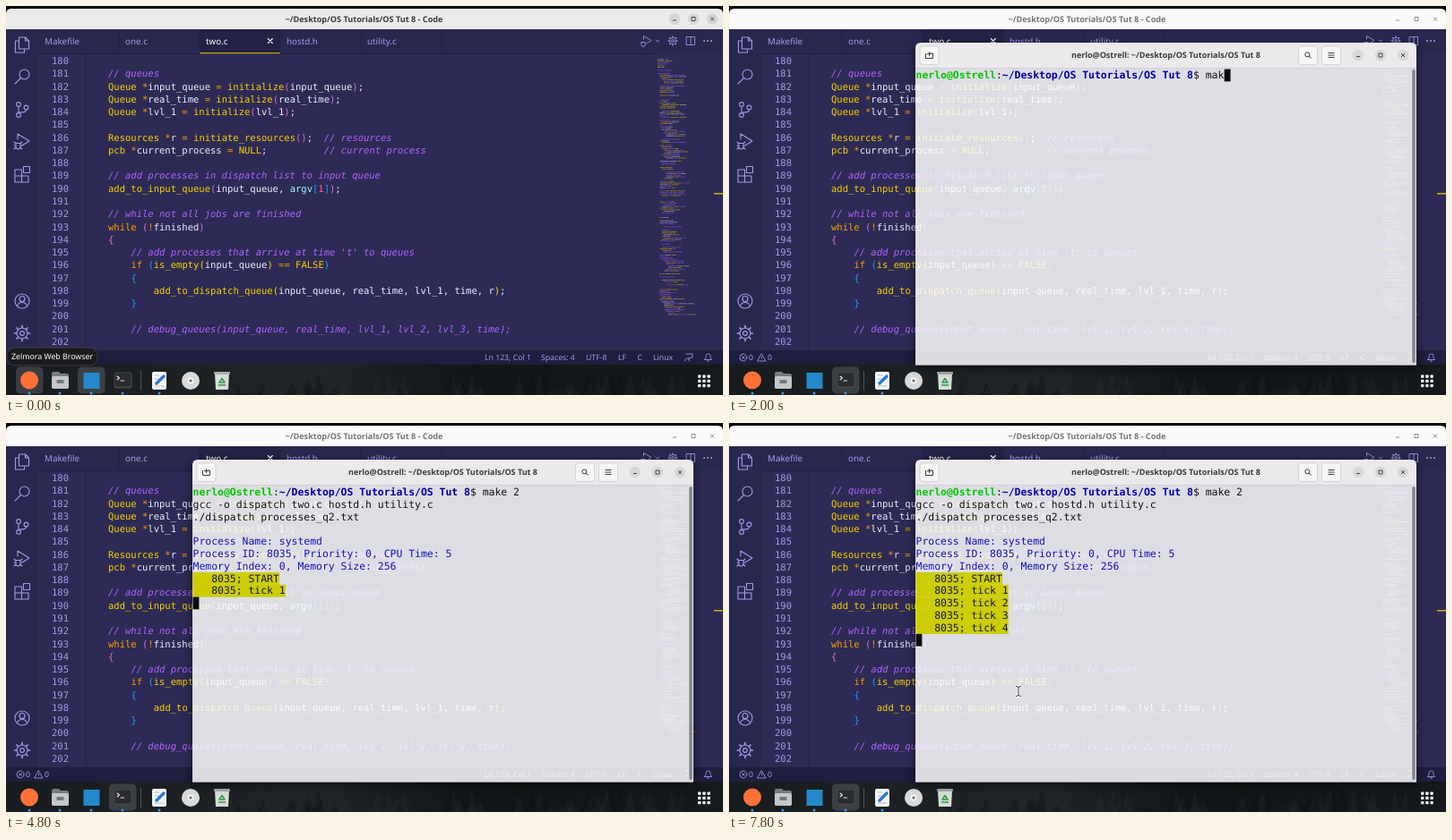
These frames come from a looping animation (800x435 px, 8000 ms). An HTML page:

```html
<!DOCTYPE html>
<html lang="en">
<head>
<meta charset="utf-8">
<title>Editor and terminal</title>
<style>
html, body { margin: 0; width: 100%; height: 100%; overflow: hidden; background: #111417; }
svg { display: block; width: 100%; height: 100%; }
text { white-space: pre; font-family: "Noto Sans", sans-serif; text-rendering: geometricPrecision; }
.code { font: 10.53px "DejaVu Sans Mono", monospace; }
.term { font: 11.43px "DejaVu Sans Mono", monospace; }
.line { fill: none; stroke: #a599e9; stroke-width: 1.1; stroke-linejoin: round; stroke-linecap: round; }
.thin .line { stroke-width: .85; }
</style>
</head>
<body>
<svg id="stage" viewBox="0 0 800 435">
  <defs>
    <linearGradient id="wall">
      <stop offset="0" stop-color="#181c1f"/><stop offset=".45" stop-color="#1f2427"/>
      <stop offset=".65" stop-color="#121517"/><stop offset="1" stop-color="#16191b"/>
    </linearGradient>
    <filter id="shadow" x="-10%" y="-10%" width="120%" height="125%"><feGaussianBlur stdDeviation="5"/></filter>
    <clipPath id="around"><path clip-rule="evenodd" d="M0 0H800V435H0ZM208 47q0-6 6-6H761q6 0 6 6V402H208Z"/></clipPath>
  </defs>
  <g id="editor"></g>
  <g id="dock"></g>
  <g id="tooltip"></g>
  <g id="terminal"></g>
  <g id="pointer"></g>
</svg>
<script>
const $ = id => document.getElementById(id);
const PURPLE = '#a599e9';

const rect = (x, y, w, h, fill, r = 0, extra = '') =>
  `<rect x="${x}" y="${y}" width="${w}" height="${h}" rx="${r}" fill="${fill}" ${extra}/>`;
const circle = (x, y, r, fill, extra = '') => `<circle cx="${x}" cy="${y}" r="${r}" fill="${fill}" ${extra}/>`;
const label = (x, y, size, fill, str, extra = '') =>
  `<text x="${x}" y="${y}" font-size="${size}" fill="${fill}" ${extra}>${str}</text>`;
const line = (d, extra = '') => `<path class="line" d="${d}" ${extra}/>`;
const ring = (x, y, r) => circle(x, y, r, 'none', 'class="line"');
const thin = content => `<g class="thin">${content}</g>`;
const span = (fill, str, extra = '') => `<tspan fill="${fill}" ${extra}>${str}</tspan>`;
const seeded = seed => () => (seed = (seed * 16807) % 2147483647) / 2147483647;

const FIRST_LINE = 180, LINE_HEIGHT = 14.27;
const source = `
// queues
Queue *input_queue = initialize(input_queue);
Queue *real_time = initialize(real_time);
Queue *lvl_1 = initialize(lvl_1);

Resources *r = initiate_resources();  // resources
pcb *current_process = NULL;          // current process

// add processes in dispatch list to input queue
add_to_input_queue(input_queue, argv[1]);

// while not all jobs are finished
while (!finished)
{
    // add processes that arrive at time 't' to queues
    if (is_empty(input_queue) == FALSE)
    {
        add_to_dispatch_queue(input_queue, real_time, lvl_1, time, r);
    }

    // debug_queues(input_queue, real_time, lvl_1, lvl_2, lvl_3, time);
`.split('\n');

const bracketColors = ['#ffd700', '#da70d6', '#179fff'];
let depth = 1;

function highlight(text) {
  const token = /(\/\/.*)|\b(while|if)\b|(\w+(?=\()|Queue|Resources|pcb|NULL|FALSE)|(argv)|([a-z_]\w*)|(\d+)|([(\[{])|([)\]}])|([*=!]+)|[^]/g;
  return text.replace(token, (s, comment, keyword, name, param, word, number, open, close, operator) => {
    if (comment) return span('#b362ff', s, 'font-style="italic"');
    if (keyword) return span('#ff9d00', s);
    if (name) return span('#fad000', s);
    if (param) return span('#9effff', s);
    if (number) return span('#ff628c', s);
    if (open) return span(bracketColors[depth++ % 3], s);
    if (close) return span(bracketColors[--depth % 3], s);
    if (operator) return span('#ff9d00', s);
    return span('#f0eeff', s);
  });
}

// Functions of random length: a comment, then a body whose indent wanders
function minimap() {
  const random = seeded(77);
  const colors = ['#fad000', '#e1dcff', '#fad000', '#b362ff'];
  let out = '', indent = 0, rowsLeft = 0;
  for (let y = 54; y < 346; y += 1.75) {
    const header = y < 76;
    if (rowsLeft-- <= 0) {
      rowsLeft = 7 + random() * 14;
      indent = 0;
      continue;
    }
    indent = header ? 0 : Math.max(1, Math.min(5, indent + Math.floor(random() * 3) - 1));
    if (random() < 0.2) continue;
    let x = 727 + indent * 2.4;
    const words = header ? 1 + random() : 1 + random() * 2.6;
    const comment = random() < 0.3;
    for (let i = 0; i < words; i++) {
      const w = 2 + random() * 8;
      const fill = comment ? '#b362ff' : colors[Math.floor(random() * 4)];
      out += rect(x.toFixed(1), y.toFixed(1), w.toFixed(1), 1, fill);
      x += w + 0.8;
    }
  }
  return `<g opacity=".42">${out}</g>`;
}

// Minimise, maximise and close glyphs
const windowButtons = (xs, y, color, disc) =>
  (disc ? xs.map(x => circle(x, y, 6.2, disc)).join('') : '') +
  `<path fill="none" stroke="${color}" d="M${xs[0] - 2} ${y + 1.5}h4M${xs[1] - 2} ${y - 2}h4v4h-4zM${xs[2] - 2} ${y - 2}l4 4m0-4l-4 4"/>`;

const gear = (x, y, r) => {
  let teeth = '';
  for (let i = 0; i < 8; i++) {
    const c = Math.cos(i * Math.PI / 4), s = Math.sin(i * Math.PI / 4);
    teeth += `M${x + c * r * .75} ${y + s * r * .75}L${x + c * r} ${y + s * r}`;
  }
  return ring(x, y, r * .7) + ring(x, y, r * .28) + line(teeth, `style="stroke-width:${r * .2}"`);
};

function activityBar() {
  return line('M14.5 35h7l4 4v9h-11zM21.5 35v4h4M14.5 39h-4v13h10v-4') +
    line('M16 81l-6 6') + ring(20.5, 76.5, 5.5) +
    ring(14, 110, 2.4) + ring(14, 122, 2.4) + ring(22.5, 113.5, 2.4) +
    line('M14 112.5v7M22.5 116c0 3-3 3-8.5 3') +
    line('M13 149v-6l13 8-8 5M11 153.5h5v4a2.5 2.5 0 0 1-5 0zM9 152l2 2m7-2l-2 2M9 156h2m5 0h2M9 160l2-2m7 2l-2-2') +
    line('M10 183h7.5v14h-7.5zM10 190h15v7h-7.5M19.5 179.5h7v7h-7z') +
    ring(18, 330, 8) + ring(18, 327.5, 3) + line('M12.5 336c1-6 10-6 11 0') + gear(18, 366, 8.5);
}

function editor(focused) {
  let out = rect(0, 0, 800, 401, '#060608') +
    `<path d="M0 26V9q0-6 6-6H794q6 0 6 6V26z" fill="${focused ? '#ebebeb' : '#fafafa'}"/>` +
    label(399.5, 18, 9.1, focused ? '#3b3b3b' : '#77757b', '~/Desktop/OS Tutorials/OS Tut 8 - Code',
      'text-anchor="middle" font-weight="700"') +
    windowButtons([746, 767, 788], 14.5, focused ? '#444' : '#8a888c', focused && '#d6d6d6') +
    rect(0, 26, 800, 359, '#2d2b55') + rect(0, 26, 36, 359, '#28284e') + rect(36, 26, 764, 27, '#28284e') +
    rect(36, 53, 690, 1, '#1e1e3f') + rect(88.6, 54, .7, 331, '#1e1e3f') +
    rect(216, 26, 90, 27, '#222244') + rect(216, 52.2, 90, 1, '#fad000');
  ['Makefile', 'one.c', 'two.c', 'hostd.h', 'utility.c'].forEach((name, i) => {
    out += label(43 + i * 90, 43, 9.8, i === 2 ? '#fff' : PURPLE, name) +
      rect(125.7 + i * 90, 26, .6, 27, '#222244');
  });
  out += line('M292.3 36.5l5 5m0-5l-5 5', 'style="stroke:#fff"') +
    thin(line('M711.5 37v-3.5l8.5 5-5.5 3.5M709 40.5h4v3a2 2 0 0 1-4 0zM725 38l2 2 2-2M759.5 34.5h9v9h-9zM764 34.5v9') +
      gear(744, 39, 5.2)) +
    [779, 783, 787].map(x => circle(x, 39, 1, PURPLE)).join('') + activityBar();

  depth = 1;
  source.forEach((text, i) => {
    const y = (65 + i * LINE_HEIGHT).toFixed(2);
    out += `<text class="code" x="70" y="${y}" fill="${PURPLE}" text-anchor="end">${FIRST_LINE + i}</text>` +
      `<text class="code" x="114" y="${y}">${highlight(text)}</text>`;
  });
  out += minimap() + rect(790, 209, 10, 1.6, '#c9a815') + rect(0, 385, 800, 16.5, '#1e1e3f');

  const status = [[22, '0'], [43, '0'], [534, 'Ln 123, Col 1'], [597, 'Spaces: 4'], [647, 'UTF-8'],
    [683, 'LF'], [704.5, 'C'], [722, 'Linux']];
  out += status.map(([x, s]) => label(x, 396.2, 8.7, PURPLE, s)).join('');
  return out + thin(ring(16, 393, 4) +
    line('M14.5 391.5l3 3m0-3l-3 3M36.5 389l4.5 8h-9zM36.5 392v2') +
    line('M759 389h7v4h-2l-2 2v-2M757.500 397c0-4 5-4 5 0M779.5 395.5h8l-1.5-2v-2a2.5 2.5 0 0 0-5 0v2zM782.5 397h2'));
}

function dock(active, hovered) {
  const random = seeded(19);
  let out = rect(0, 401, 800, 34, 'url(#wall)');
  for (let i = 0; i < 60; i++) {
    const x = 240 + random() * 520, h = 6 + random() * 22;
    out += `<path d="M${x} ${435 - h}l${3 + random() * 5} ${h}h-12z" fill="${random() < .5 ? '#0c0f11' : '#2a3033'}" opacity=".28"/>`;
  }
  const tile = x => x ? rect(x - 15, 403.5, 30.5, 30, '#fff', 5, 'fill-opacity=".15"') : '';
  out += tile(active) + tile(hovered) +
    circle(26, 418.5, 10, '#ff7139') +
    `<path d="M51 411q0-2 2-2h6l2 2h7q2 0 2 2v13q0 2-2 2h-15q-2 0-2-2z" fill="#777b80"/>` +
    rect(51, 414, 19, 14, '#c4c6c9', 2) + rect(56.5, 418, 8, 4, '#74787d', 1) +
    rect(86.5, 410, 18, 18, '#2489ca') +
    rect(120.5, 409.5, 20, 18, '#45474a', 2.5) + rect(121.5, 410.5, 18, 15, '#2a2c30', 2) +
    line('M124 414l2.5 2-2.5 2M128 419h3.5', 'style="stroke:#e8e8e8"') +
    rect(150, 408, .8, 22, '#606468') +
    rect(163, 409, 16, 20, '#f5f6f7', 2) +
    line('M166 413h5M166 417h4M166 425h10', 'style="stroke:#b7bcc3"') +
    line('M168 422l8-8', 'style="stroke:#2878d8;stroke-width:3.5"') +
    circle(206, 419, 10, '#d9d9d9') + circle(206, 419, 3.5, '#f5f5f5') + circle(206, 419, 1.6, '#63666a') +
    `<path d="M233 411h16l-1 18h-14z" fill="#d8ddd9"/>` + rect(232, 409, 18, 3, '#a8afaa', 1) +
    line('M238 421l3-4.5 3 4.5zM237.5 424h7', 'style="stroke:#2f9a4c;stroke-width:1.6"') +
    [26, 60, 95, 130, 171].map(x => circle(x, 433, 1.5, '#3b9be8')).join('');
  for (let i = 0; i < 9; i++) out += rect(772 + i % 3 * 5.2, 412.5 + Math.floor(i / 3) * 5.2, 3.4, 3.4, '#f2f2f2', .8);
  return out;
}

const tooltip = (x, w, str) => rect(x, 382, w, 20, '#1b1b1d', 9, 'stroke="#48484c" stroke-width=".7"') +
  label(x + w / 2, 395, 8.8, '#fff', str, 'text-anchor="middle"');

const HOST = 'nerlo@Ostrell', FOLDER = '~/Desktop/OS Tutorials/OS Tut 8';
const LEFT = 208.5, TOP = 70.6, ROW = 13.77, CELL = 6.883, BLUE = '#1212b8';

const terminalFrame =
  rect(206, 44, 563, 362, '#000', 8, 'opacity=".45" filter="url(#shadow)" clip-path="url(#around)"') +
  rect(208, 69, 559, 333, '#fff', 0, 'fill-opacity=".84"') +
  '<path d="M208 69.5V47q0-6 6-6H761q6 0 6 6V69.5z" fill="#ebe9eb"/>' +
  rect(208, 69, 559, .7, '#cfcbd1') +
  [[213, 21], [635.5, 21], [661.5, 21]].map(([x, w]) =>
    rect(x, 45, w, 20.5, '#f7f6f7', 3, 'stroke="#cfccd0" stroke-width=".8"')).join('') +
  '<g fill="none" stroke="#3d3d3d"><path d="M219.5 53v5.5h8v-5.5h-2.5M223.5 51v5M221 53.5h5M668.5 52.5h7M668.5 55h7M668.5 57.5h7M647 56l2.5 2.5"/><circle cx="645.3" cy="54.3" r="2.5"/></g>' +
  label(487.5, 58.4, 9, '#3b3b3b', `${HOST}: ${FOLDER}`, 'text-anchor="middle" font-weight="700"') +
  windowButtons([702, 727, 752], 55, '#444', '#dad7da') +
  rect(762.3, 71, 3.4, 328, '#858289', 1.5) + rect(208, 401.3, 559, .7, '#8a8695');

const termText = (row, content) =>
  `<text class="term" x="${LEFT}" y="${(TOP + row * ROW + 10.7).toFixed(2)}" fill="#111">${content}</text>`;

const during = (t, spans) => spans.some(([from, to]) => t >= from && t < to);
const keyTimes = [1600, 1800, 2000, 2200, 2600, 2800];
const COMPILE = 3200, START = 3600, TICK = 1000;

function terminal(t) {
  const typed = 'make 2'.slice(0, keyTimes.filter(k => k <= t).length);
  let out = terminalFrame + termText(0, span('#00c800', HOST, 'font-weight="700"') + ':' +
    span('#0000a8', FOLDER, 'font-weight="700"') + '$ ' + typed);
  let cursorRow = 0, cursorColumn = HOST.length + FOLDER.length + 3 + typed.length;
  if (t >= COMPILE) {
    out += termText(1, 'gcc -o dispatch two.c hostd.h utility.c');
    cursorRow = 2;
    cursorColumn = 0;
  }
  if (t >= START) {
    out += termText(2, './dispatch processes_q2.txt');
    ['Process Name: systemd', 'Process ID: 8035, Priority: 0, CPU Time: 5', 'Memory Index: 0, Memory Size: 256']
      .forEach((s, i) => out += termText(4 + i, span(BLUE, s)));
    const ticks = Math.floor((t - START) / TICK);
    for (let i = 0; i <= ticks; i++) {
      const s = '   8035; ' + (i ? 'tick ' + i : 'START');
      out += rect(LEFT, TOP + (7 + i) * ROW, s.length * CELL, ROW + .1, '#cdcd00') + termText(7 + i, span('#15156e', s));
    }
    cursorRow = 8 + ticks;
  }
  if (during(t, [[0, 3800], [4400, 5200], [6000, 6600], [7200, 8000]]))
    out += rect(LEFT + cursorColumn * CELL, TOP + cursorRow * ROW, CELL, ROW, '#0c0c10');
  return out;
}

function beam(x, y) {
  const d = 'M-3-5.5q3 0 3 1.500q0-1.500 3-1.500M0-4V4M-3 5.5q3 0 3-1.500q0 1.500 3 1.500';
  return `<g transform="translate(${x} ${y})" fill="none"><path d="${d}" stroke="#f4f2f6" stroke-width="3.4"/><path d="${d}" stroke="#444"/></g>`;
}

function pointer(t) {
  if (during(t, [[200, 600]]))
    return `<path transform="translate(${t < 400 ? 122 : 132} 417)" d="M0 0v12l3-3 2 4 2-1-2-4h4z" fill="#111" stroke="#fff" stroke-width=".8"/>`;
  if (t === 600) return beam(220, 362);
  if (t === 800) return beam(304, 308);
  if (t === 1000) return beam(324, 296);
  return during(t, [[1200, 1600], [5200, 8000]]) ? beam(323, 300) : '';
}

const LOOP = 8000, STEP = 200, OPEN = 1000;
let shown = -1, scene = -1;

function draw(now) {
  const t = Math.floor(now % LOOP / STEP) * STEP;
  if (t !== shown) {
    shown = t;
    const opened = t >= OPEN;
    const next = opened ? 2 : t < 200 ? 0 : 1;
    if (next !== scene) {
      scene = next;
      $('editor').innerHTML = editor(!opened);
      $('dock').innerHTML = dock(opened ? 130 : 95, [26, 130, 0][scene]);
      $('tooltip').innerHTML = [tooltip(1, 101, 'Zelmora Web Browser'), tooltip(105, 51, 'Terminal'), ''][scene];
    }
    $('terminal').innerHTML = opened ? terminal(t) : '';
    $('pointer').innerHTML = pointer(t);
  }
  requestAnimationFrame(draw);
}
draw(0);
</script>
</body>
</html>
```
